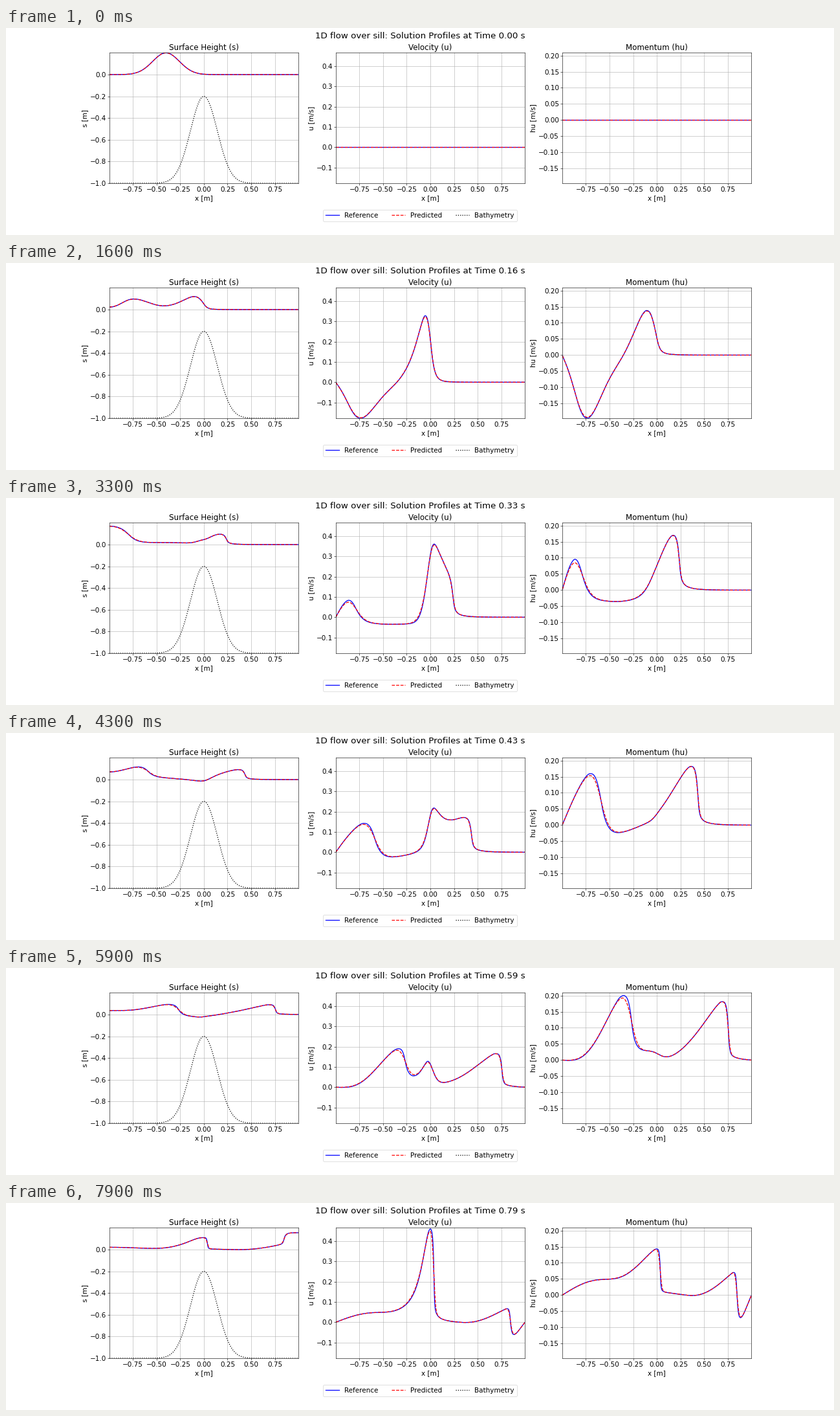
Recreate the animation shown at these times as a matplotlib script. Size 1280x320 px, loop 8 s.

```python
import numpy as np
import matplotlib.pyplot as plt
from matplotlib.animation import FuncAnimation
from matplotlib.ticker import MultipleLocator

G = 3.5
CELLS = 400
FRAMES = 80
DT_FRAME = 0.01
SUBSTEPS = 16

edges = np.linspace(-1, 1, CELLS + 1)
x = (edges[1:] + edges[:-1]) / 2
dx = x[1] - x[0]


def bell(pos, center, height):
    return height * np.exp(-25 * (pos - center) ** 2)


def bed(pos):
    return -1 + bell(pos, 0, 0.8)


bed_cell, bed_edge = bed(x), bed(edges)


def reconstruct(q, parity):
    """Minmod states left and right of every cell edge, with mirrored walls."""
    p = np.concatenate([parity * q[1::-1], q, parity * q[:-3:-1]])
    d = np.diff(p)
    a, b = d[:-1], d[1:]
    half = np.where(a * b > 0, np.where(abs(a) < abs(b), a, b), 0) / 2
    inner = p[1:-1]
    return (inner + half)[:-1], (inner - half)[1:]


def side(s, u):
    h = s - bed_edge
    m = h * u
    state = np.array([s, m])
    flux = np.array([m, m * u + G / 2 * (s**2 - 2 * s * bed_edge)])
    return state, flux, np.sqrt(G * h)


def rate(q):
    """Shallow water equations for surface height and momentum, HLL fluxes."""
    s, m = q
    s_l, s_r = reconstruct(s, 1)
    u_l, u_r = reconstruct(m / (s - bed_cell), -1)
    q_l, f_l, c_l = side(s_l, u_l)
    q_r, f_r, c_r = side(s_r, u_r)
    lo = np.minimum(u_l - c_l, u_r - c_r)
    hi = np.maximum(u_l + c_l, u_r + c_r)
    flux = (hi * f_l - lo * f_r + hi * lo * (q_r - q_l)) / (hi - lo)
    out = -np.diff(flux, axis=1) / dx
    out[1] -= G * (s_r[:-1] + s_l[1:]) / 2 * np.diff(bed_edge) / dx
    return out


def solve():
    q = np.array([bell(x, -0.4, 0.2), np.zeros(CELLS)])
    dt = DT_FRAME / SUBSTEPS
    states = [q]
    for _ in range(FRAMES - 1):
        for _ in range(SUBSTEPS):
            mid = q + dt * rate(q)
            q = (q + mid + dt * rate(mid)) / 2
        states.append(q)
    return states


def soften(fields, t):
    """Predicted profiles: smoother than the reference, most left of the sill."""
    ramp = np.clip((t - 0.08) / 0.12, 0, 1)
    left = 1 / (1 + np.exp((x + 0.1) / 0.05))
    sigma = np.maximum(ramp * (0.011 + 0.027 * left), 0.001)[:, None]

    def kernel(pos):
        return np.exp(-(((x[:, None] - pos) / sigma) ** 2) / 2)

    direct, mirror = kernel(x), kernel(-2 - x) + kernel(2 - x)
    total = (direct + mirror).sum(axis=1)
    return [(direct + p * mirror) @ f / total for f, p in zip(fields, (1, -1, -1))]


history = []
for n, (s, m) in enumerate(solve()):
    fields = [s, m / (s - bed_cell), m]
    history.append((fields, soften(fields, n * DT_FRAME)))

plt.rcParams.update({"font.family": "DejaVu Sans", "font.size": 14})
fig, axes = plt.subplots(1, 3, figsize=(24, 6), dpi=1280 / 24)
fig.subplots_adjust(left=0.125, right=0.9, top=0.88, bottom=0.25, wspace=0.2)
heading = fig.suptitle("", fontsize=18)

panels = [
    ("Surface Height (s)", "s [m]", (-1, 0.1999), 0.2),
    ("Velocity (u)", "u [m/s]", (-0.1781, 0.4664), 0.1),
    ("Momentum (hu)", "hu [m/s]", (-0.1955, 0.2083), 0.05),
]
reference, predicted = [], []
for ax, (title, label, limits, step) in zip(axes, panels):
    reference += ax.plot(x, 0 * x, "b-", lw=1.7, label="Reference")
    predicted += ax.plot(x, 0 * x, "r--", lw=1.7, label="Predicted")
    ax.set_title(title, fontsize=16)
    ax.set_xlabel("x [m]")
    ax.set_ylabel(label)
    ax.set_xlim(x[0], x[-1])
    ax.set_ylim(*limits)
    ax.xaxis.set_major_locator(MultipleLocator(0.25))
    ax.yaxis.set_major_locator(MultipleLocator(step))
    ax.grid(True)
axes[0].plot(x, bed_cell, "k:", lw=1.7, label="Bathymetry")

handles, names = axes[0].get_legend_handles_labels()
fig.legend(handles, names, loc="lower center", ncol=3, bbox_to_anchor=(0.5, 0.05))


def draw(n):
    for lines, fields in zip((reference, predicted), history[n]):
        for line, values in zip(lines, fields):
            line.set_ydata(values)
    heading.set_text(
        f"1D flow over sill: Solution Profiles at Time {n * DT_FRAME:.2f} s"
    )
    return reference + predicted + [heading]


anim = FuncAnimation(fig, draw, frames=FRAMES, interval=100, repeat=True, repeat_delay=0)
plt.show()
```
